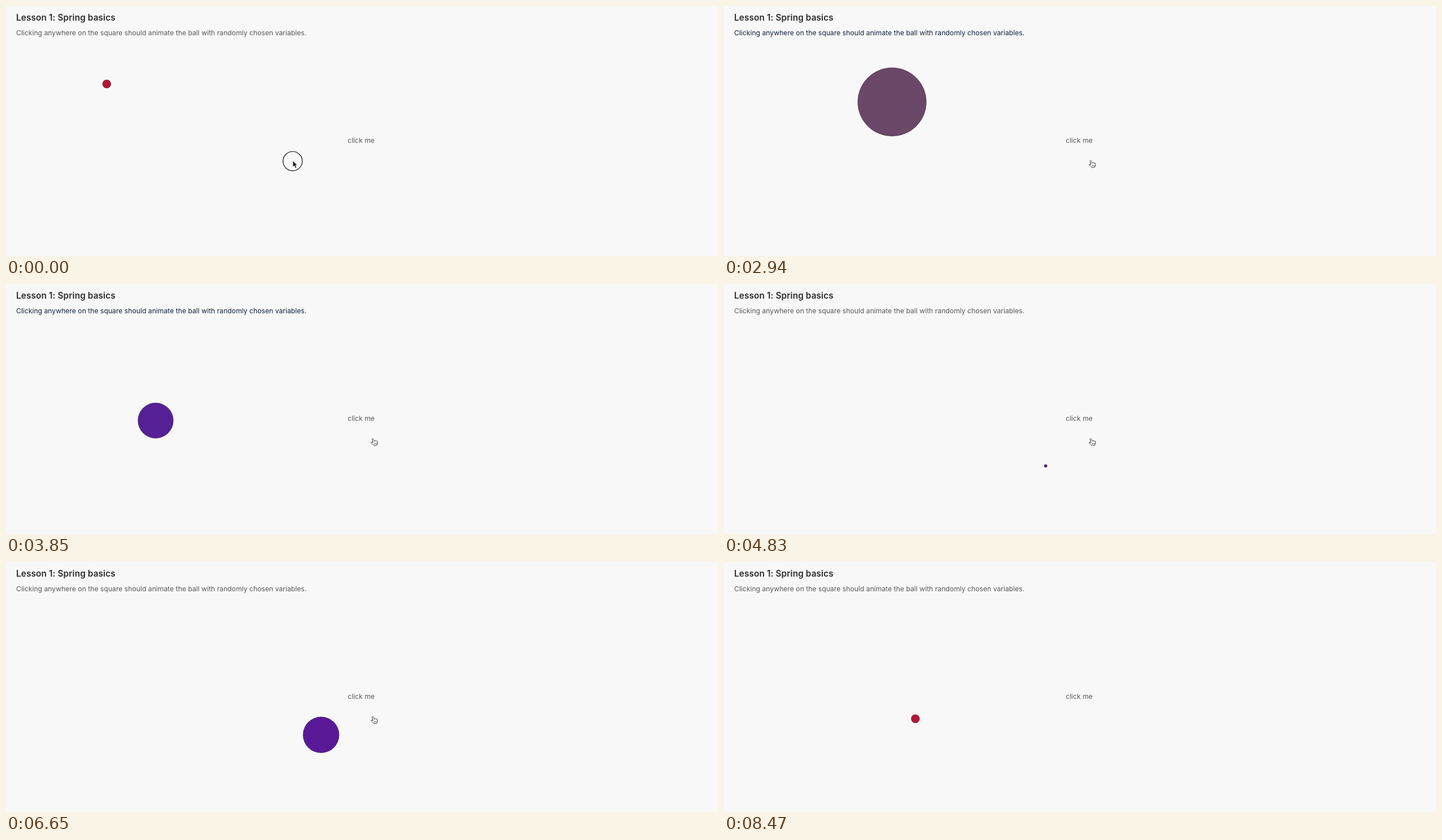
An HTML page that plays this animation: 1261x444 px, repeating every 8540 ms.

```html
<!DOCTYPE html>
<html lang="en">
<head>
<meta charset="utf-8">
<title>Spring basics</title>
<style>
  html, body { margin: 0; width: 100%; height: 100%; overflow: hidden; background: #f8f8f8; }
  svg { display: block; width: 1261px; height: 444px; font: 12.15px Inter, sans-serif; }
  text { fill: #585858; letter-spacing: .02px; }
  .title { font-size: 15.4px; font-weight: 600; fill: #2b2b2e; letter-spacing: .08px; }
  #intro.dark { fill: #10223f; }
  #ball { stroke: rgba(0, 0, 0, .3); stroke-width: .9; }
  #ring { fill: none; stroke: #111; stroke-width: 1.2; }
</style>
</head>
<body>
<svg viewBox="0 0 1261 444">
  <text class="title" x="18" y="25.7">Lesson 1: Spring basics</text>
  <text id="intro" x="18" y="52">Clicking anywhere on the square should animate the ball with randomly chosen variables.</text>
  <text x="605.2" y="242.8">click me</text>
  <circle id="ball"/>
  <g id="cursor">
    <circle id="ring" r="17.1"/>
    <path id="arrow" d="M.5 -.5V10.2L3 8L5 12.3L6.8 11.4L4.9 7.3H8Z" fill="#111" stroke="#fff" stroke-width=".5"/>
    <g id="hand" fill="#fff" stroke="#222" stroke-width=".9" stroke-linejoin="round" stroke-linecap="round">
      <path d="M-3.6 -.6Q-2.4 -1.8 -1.5 -.5L.2 3.4Q1 2.3 2 3.2Q3.2 2.3 4 3.4Q5.4 2.8 5.8 4.3L5.9 8Q5.5 11.6 1.4 11.5Q-.9 11.5 -2 9.8L-5.2 6.6Q-5.8 5.2 -4.1 5.1L-2.2 6Z"/>
      <path d="M.4 7.3V9M2.2 7.2V9M4 7.1V8.9" stroke-width=".7"/>
    </g>
  </g>
</svg>
<script>
const LOOP = 8540, STEP = 70;
const $ = id => document.getElementById(id);
const ball = $('ball'), cursor = $('cursor'), ring = $('ring');

// Poses are x, y, radius, red, green, blue.
const start = [178.4, 138.4, 7.5, 176, 24, 53];

// Each click starts a spring that passes through the pose at the given time.
const clicks = [
  { at: 0,    pass: 910,  pose: [722.5, 338, 21.2, 58, 126, 162] },
  { at: 2625, pass: 2940, pose: [297.6, 170.4, 60.8, 107, 71, 104] },
  { at: 3430, pass: 3850, pose: [265, 242.5, 31.4, 86, 33, 149] },
  { at: 4410, pass: 4830, pose: [569.7, 323, 2.6, 75, 26, 124] },
  { at: 6265, pass: 6650, pose: [558, 307, 32, 90, 25, 150] },
  { at: 7210, pass: 7630, pose: [440, 398, 32, 128, 25, 105] },
  { at: 8085, pass: 8470, pose: [338.9, 278.4, 7.5, 176, 24, 53] }
];

// Critically damped step response.
const spring = ms => 1 - (1 + .013 * ms) * Math.exp(-.013 * ms);

function poseAt(t) {
  let pose = start;
  clicks.forEach((c, i) => {
    if (t < c.at) return;
    const end = Math.min(t, clicks[i + 1]?.at ?? LOOP);
    const k = spring(end - c.at) / spring(c.pass - c.at);
    pose = pose.map((v, j) => v + (c.pose[j] - v) * k);
  });
  return pose;
}

function glide(t, from, to, a, b) {
  const p = Math.min(1, Math.max(0, (t - from) / (to - from)));
  return a + (b - a) * p * p * (3 - 2 * p);
}

const show = (el, on) => el.style.display = on ? '' : 'none';

function draw(t) {
  const [x, y, r, ...rgb] = poseAt(t);
  ball.setAttribute('cx', x);
  ball.setAttribute('cy', y);
  ball.setAttribute('r', Math.max(0, r));
  ball.setAttribute('fill', `rgb(${rgb.map(Math.round)})`);

  const hand = t >= 420;
  const cx = t < 910 ? glide(t, 350, 910, 507.7, 718) : glide(t, 910, 1190, 718, 652);
  cursor.setAttribute('transform', `translate(${cx} 275.6)`);
  show(cursor, t < 8400);
  show($('arrow'), !hand);
  show($('hand'), hand);
  show(ring, clicks.some(c => t >= c.at && t < c.at + 150));
  $('intro').classList.toggle('dark', t >= 2660 && t < 4410);
}

const t0 = performance.now();
function tick() {
  const t = (performance.now() - t0) % LOOP;
  draw(Math.floor(t / STEP) * STEP);
  requestAnimationFrame(tick);
}
tick();
</script>
</body>
</html>
```
